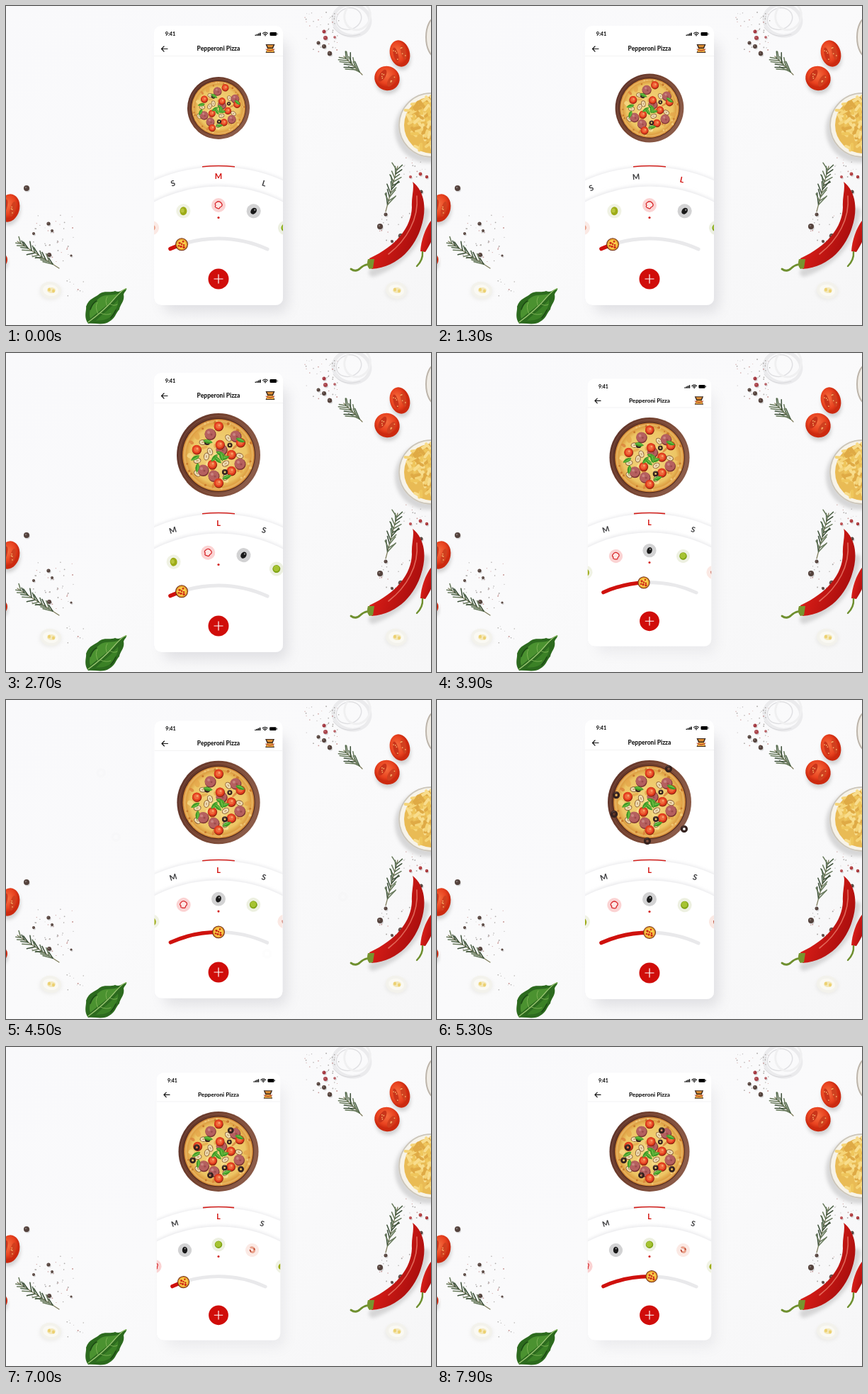
An HTML page that plays this animation: 600 by 450 pixels, repeating every 8000 ms.

```html
<!DOCTYPE html>
<html lang="en">
<head>
<meta charset="utf-8">
<title>Pizza builder</title>
<style>
  html, body { margin: 0; width: 100%; height: 100%; overflow: hidden; background: #f8f8fa; }
  svg { display: block; width: 100vw; height: 100vh; }
  text { font-family: Lato, "Open Sans", sans-serif; text-anchor: middle; fill: #161616; }
</style>
</head>
<body>
<svg viewBox="0 0 600 450" xmlns="http://www.w3.org/2000/svg">
  <defs>
    <filter id="soft" x="-30%" y="-30%" width="160%" height="160%"><feGaussianBlur stdDeviation="9"/></filter>
    <filter id="haze" x="-20%" y="-20%" width="140%" height="140%"><feGaussianBlur stdDeviation="2.5"/></filter>
    <linearGradient id="table" x2="1" y2="1">
      <stop stop-color="#f9f9fb"/><stop offset=".5" stop-color="#fafafb"/><stop offset="1" stop-color="#f6f6f7"/>
    </linearGradient>
    <linearGradient id="wood" x2="1" y2=".4"><stop stop-color="#5a3029"/><stop offset=".5" stop-color="#74422f"/><stop offset="1" stop-color="#8a5a47"/></linearGradient>
    <radialGradient id="cheese"><stop stop-color="#f3d884"/><stop offset=".85" stop-color="#edc564"/><stop offset="1" stop-color="#dc9c40"/></radialGradient>
    <radialGradient id="tomato" cx=".4" cy=".4"><stop stop-color="#f56f40"/><stop offset=".7" stop-color="#e8421f"/><stop offset="1" stop-color="#cc2a10"/></radialGradient>
    <linearGradient id="chili" x2="1" y2=".6"><stop stop-color="#e2382a"/><stop offset=".5" stop-color="#cf1a15"/><stop offset="1" stop-color="#a50d0d"/></linearGradient>
    <clipPath id="screen"><rect x="209" y="28" width="182" height="394" rx="10"/></clipPath>
  </defs>
  <rect width="600" height="450" fill="url(#table)"/>
  <g id="scene"></g>
  <g id="phone">
    <rect id="shade" x="222" y="50" width="176" height="382" rx="12" fill="#8a8a96" filter="url(#soft)"/>
    <rect x="209" y="28" width="182" height="394" rx="10" fill="#fff"/>
    <g clip-path="url(#screen)">
      <g id="bar"></g>
      <circle cx="300" cy="453" r="227" fill="#e6e6e9" filter="url(#haze)"/>
      <circle cx="300" cy="453" r="226" fill="#fff"/>
      <circle cx="300" cy="453" r="200" fill="#e6e6e9" filter="url(#haze)"/>
      <circle cx="300" cy="453" r="198.500" fill="#fff"/>
      <path d="M277 226.700A227 227 0 0 1 323 226.700" fill="none" stroke="#d3201c" stroke-width="1.600"/>
      <g id="sizes"></g>
      <g id="fills"></g>
      <circle cx="300" cy="298.500" r="1.600" fill="#d3201c"/>
      <path id="rail" fill="none" stroke="#e9e9eb" stroke-width="5" stroke-linecap="round"/>
      <path id="level" fill="none" stroke="#cf110d" stroke-width="5.500" stroke-linecap="round"/>
      <g id="knob"></g>
      <circle cx="300" cy="385" r="14.500" fill="#d00d0a"/>
      <path d="M293.500 385H306.500M300 378.500V391.500" stroke="#fff" stroke-width="1.200"/>
    </g>
    <g id="pizza"></g>
    <g id="rings"></g>
  </g>
</svg>
<script>
const $ = id => document.getElementById(id);
const rad = d => d * Math.PI / 180;
const LOOP = 8000;

let seed = 7;
const rnd = () => (seed = seed * 16807 % 2147483647) / 2147483647;
const span = (a, b) => a + (b - a) * rnd();
const pick = list => list[Math.floor(rnd() * list.length)];

const disc = (x, y, r, fill, more = '') => `<circle cx="${x}" cy="${y}" r="${r}" fill="${fill}" ${more}/>`;
const oval = (x, y, rx, ry, turn, fill, more = '') =>
  `<ellipse rx="${rx}" ry="${ry}" transform="translate(${x} ${y}) rotate(${turn})" fill="${fill}" ${more}/>`;
const line = (d, color, w, more = '') =>
  `<path d="${d}" fill="none" stroke="${color}" stroke-width="${w}" stroke-linecap="round" stroke-linejoin="round" ${more}/>`;
const shape = (d, fill, more = '') => `<path d="${d}" fill="${fill}" ${more}/>`;
const repeat = (n, fn) => Array.from({ length: n }, (_, i) => fn(i)).join('');
const blur = 'opacity=".3" filter="url(#haze)"';

// Table ingredients
// A sprig grows from base to tip; its leaves lean towards the tip.
function sprig(x1, y1, x2, y2, n, leaf) {
  const a = Math.atan2(y2 - y1, x2 - x1);
  return line(`M${x1} ${y1}L${x2} ${y2}`, '#7c7a58', 1.2) + repeat(n, i => {
    const k = .15 + .85 * i / n, x = x1 + (x2 - x1) * k, y = y1 + (y2 - y1) * k;
    return [-1, 1].map(side => {
      const b = a + side * span(.3, .85), len = leaf * span(.7, 1.15) * (1.1 - .4 * k);
      return line(`M${x} ${y}l${Math.cos(b) * len} ${Math.sin(b) * len}`, pick(['#3c4f38', '#4e6448', '#66785a']), 1.5);
    }).join('');
  });
}

function halfTomato(x, y, rx, ry, turn) {
  return oval(x + 1, y + 5, rx, ry, turn, '#777', blur) +
    oval(x, y, rx, ry, turn, 'url(#tomato)') +
    `<g transform="translate(${x} ${y}) rotate(${turn})">` +
    oval(-rx * .42, 0, rx * .24, ry * .55, 0, '#c9341a') + oval(rx * .38, 0, rx * .24, ry * .55, 0, '#d0401f') +
    repeat(8, i => disc((i % 2 ? .38 : -.42) * rx + span(-2, 2), span(-.4, .4) * ry, .9, '#f7ad68')) + '</g>';
}

const specks = (x, y, w, h, n) => repeat(n, () =>
  disc(x + span(0, w), y + span(0, h), span(.4, 1), rnd() < .3 ? '#b06a66' : '#8d8986', 'opacity=".7"'));
const corns = list => list.map(([x, y, r, c]) =>
  disc(x + 1, y + 1.5, r, '#888', 'opacity=".3"') + disc(x, y, r, c || '#54423c') +
  disc(x - r / 4, y - r / 4, r / 3, '#fff', 'opacity=".25"')).join('');

const egg = (x, y) => oval(x, y + 2, 16, 12, 0, '#d2d0c8', blur) + oval(x, y, 15, 12, 10, '#f3f2ec') +
  oval(x, y, 11, 8, 10, '#faf9f3') + oval(x + 1, y, 6, 4, 0, '#f4e8b8') +
  oval(x - 2, y - 1, 2, 2.5, 0, '#ecd070') + oval(x + 4, y + 1, 2, 2.5, 0, '#ecd070');

function scene() {
  const bowl = disc(596, 174, 47, '#888', blur) + disc(600, 168, 46, '#e4e1da') +
    disc(600, 168, 44, '#f7f3e8') + disc(602, 168, 40, '#e9bb55') +
    repeat(75, () => {
      const a = span(1.4, 4.9), d = 38 * Math.sqrt(rnd()), turn = span(0, 6.3);
      return line(`M${602 + d * Math.cos(a)} ${168 + d * Math.sin(a)}l${8 * Math.cos(turn)} ${8 * Math.sin(turn)}`,
        pick(['#f5d478', '#efc65c', '#f8dd8d', '#dfaa45']), 4);
    }) + disc(600, 168, 45, 'none', 'stroke="#cbc5b9" stroke-width="1.500"');
  const onion = oval(488, 20, 26, 22, 10, 'none', 'stroke="#ebebed" stroke-width="5"') +
    oval(484, 18, 18, 15, -20, 'none', 'stroke="#e0e0e3" stroke-width="1.500"') +
    oval(496, 14, 18, 20, 20, 'none', 'stroke="#f0f0f1" stroke-width="3"') +
    line('M462 30Q475 48 500 40', '#d8d8db', 1);
  const basil = shape('M116 448C109 438 114 430 113 424C117 412 127 411 132 406C139 401 146 405 154 402C161 405 164 400 170 398C171 401 167 403 166 407C168 416 161 421 160 428C155 433 154 441 146 445C138 451 126 447 116 448Z', '#2c6a1e') +
    shape('M119 441C115 428 124 418 133 411C140 406 150 409 158 406C152 416 138 425 119 441Z', '#4b9230') +
    shape('M127 444C136 434 148 427 158 414C160 422 154 430 148 438C141 444 134 443 127 444Z', '#3b8126') +
    line('M116 446Q138 430 152 414T170 399', '#9cc773', 1.2) +
    line('M130 434Q125 425 129 418M143 423Q139 416 143 410M133 433Q142 437 148 434M146 420Q153 424 157 421', '#7fb457', .9) +
    line('M119 428Q122 419 128 416M148 440Q153 434 155 429', '#1c4a14', 1.6);
  const peppers = line('M592 290Q582 352 518 376', '#888', 12, blur) +
    shape('M574 248C577 256 572 270 573 284C572 312 552 338 513 356L516 371C556 368 578 338 586 312C594 288 592 262 574 248Z', 'url(#chili)') +
    line('M580 268C583 300 566 330 540 350', '#f28b78', 1.6, 'opacity=".7"') +
    line('M516 364Q506 364 500 370T487 371', '#6e8f2e', 2.8) + shape('M511 357L520 357L518 370L513 371Q508 366 511 357Z', '#77952f') +
    shape('M604 298C594 308 586 328 585 346L592 347C598 338 602 330 606 318Z', 'url(#chili)') +
    line('M588 347Q589 358 580 367', '#6e8f2e', 2.4);
  return onion + specks(422, 8, 48, 62, 45) + specks(36, 292, 60, 72, 42) + specks(524, 292, 55, 40, 22) + specks(560, 210, 36, 36, 16) +
    specks(84, 385, 26, 26, 10) +
    corns([[449, 36, 2.5, '#a2333c'], [451, 45, 3, '#a8434a'], [457, 67, 3.2], [449, 57, 3], [441, 52, 2.5], [464, 44, 1.8, '#b4555a'],
      [29, 257, 4], [60, 307, 2.6], [65, 317, 2], [61, 351, 3], [92, 352, 1.6], [39, 321, 2],
      [528, 311, 4], [536, 294, 2.5], [557, 324, 3], [585, 237, 2.4, '#b03a3c'], [594, 241, 2.2, '#a83336'], [571, 241, 2, '#b9474a'], [586, 262, 2.5], [545, 332, 2]]) +
    halfTomato(4, 285, 15, 20, 15) + halfTomato(-5, 358, 7, 9, 0) +
    halfTomato(556, 67, 14, 19, -15) + halfTomato(538, 102, 18, 17, 30) +
    sprig(75, 370, 16, 332, 10, 14) + sprig(503, 97, 477, 71, 7, 17) + sprig(536, 290, 553, 226, 10, 15) +
    egg(63, 401) + egg(551, 401) + basil + bowl +
    oval(607, 44, 14, 28, 0, '#f0ece5', 'stroke="#bdb5ab" stroke-width="2"') + peppers;
}

// Phone parts
const bar = `<text x="232" y="42" font-size="7.200" font-weight="800">9:41</text>
  <text x="300" y="63" font-size="8.500" font-weight="800">Pepperoni Pizza</text>` +
  repeat(4, i => `<rect x="${351.500 + i * 2.2}" y="${40.5 - i}" width="1.600" height="${1.5 + i}" rx=".4"/>`) +
  line('M362.500 38.600Q366 35.800 369.500 38.600M364 40.200Q366 38.600 368 40.200', '#161616', 1.2) + disc(366, 41.5, .9, '#161616') +
  '<rect x="372.500" y="37" width="9.500" height="5" rx="1.300"/><rect x="382.700" y="38.500" width=".8" height="2"/>' +
  line('M228 60.500H219.500M223 57L219.500 60.500L223 64', '#161616', 1.2) +
  shape('M366.500 54H379.500L377 60L379.500 66H366.500L369 60Z', '#3c2a20') +
  shape('M368.500 55H377.500L376 58.500H370Z', '#d98b32') + shape('M369 60H377L378.500 65H367.500Z', '#e9a741') +
  line('M367 61L373 63L379 61', '#b5311f', 1) +
  '<path d="M209 70.500H391" stroke="#f0f0f2" stroke-width=".8"/>';

const olive = (x, y, r) => disc(x, y, r * .7, 'none', `stroke="#34211e" stroke-width="${r * .65}"`) +
  line(`M${x - r * .6} ${y - r * .5}A${r * .8} ${r * .8} 0 0 1 ${x + r * .2} ${y - r * .8}`, '#866b63', .6);
const leafAt = (x, y, turn) => `<g transform="translate(${x} ${y}) rotate(${turn})">` +
  shape('M-7 0Q-2 -6 7 0Q0 5.500 -7 0Z', '#3f9a26') + shape('M-6 0Q-1 -4 6 0Z', '#6cbf45') + '</g>';

function pizza() {
  const scatter = (n, r0, r1, fn) => repeat(n, () => {
    const a = span(0, 6.28), d = span(r0, r1);
    return fn(d * Math.cos(a), d * Math.sin(a));
  });
  const salami = [[-12, -30], [30, 12], [-22, 21], [24, -27], [-7, 29], [4, -8]];
  const cherry = [[0, -41], [2, -15], [18, -1], [-31, -8], [18, 22], [0, 39], [-9, 13], [31, -18]];
  const mush = [[-22, -18], [14, -24], [-17, 2], [10, 12], [30, 1], [-12, -5], [10, 31], [-30, 8], [-30, 26]];
  const leaves = [[-6, 4, 130], [3, -2, 20], [-1, 7, 40], [9, 4, -20], [31, -21, 20], [-33, 4, 150], [-30, 18, 95], [12, 31, -25], [-15, -19, 10], [4, 2, 75]];
  return disc(0, 0, 59, 'url(#wood)') + disc(0, 0, 55.500, 'none', 'stroke="#9c6a57" stroke-width=".8" opacity=".6"') +
    disc(0, 0, 52, '#4a241a') + disc(0, 0, 51, '#cf8436') + disc(0, 0, 49.500, '#e6b05a') + disc(0, 0, 46.500, 'url(#cheese)') +
    scatter(24, 43, 49, (x, y) => disc(x, y, span(1, 2.2), pick(['#c97a2e', '#f0c877']))) +
    scatter(34, 2, 43, (x, y) => oval(x, y, span(2, 6), span(1.5, 4), span(0, 180), pick(['#f8e29a', '#e5a64b', '#d9803a', '#f6da86']), 'opacity=".8"')) +
    mush.map(([x, y], i) => oval(x, y, 5.500, 4, i * 50, '#8f6238') + oval(x, y, 4.500, 3, i * 50, '#f0deb4') + oval(x, y, 2, 1, i * 50, '#c9a673')).join('') +
    salami.map(([x, y]) => disc(x + .6, y + 1, 8, '#7c3433') + disc(x, y, 7.500, '#b5605f') + disc(x - 2, y - 2, 2, '#c98481') + disc(x + 2, y + 1, 1.500, '#9b4a4b')).join('') +
    cherry.map(([x, y]) => disc(x + .4, y + .8, 6.700, '#8f1f10') + disc(x, y, 6.200, '#e33d1e') + disc(x, y, 3.800, '#ef6a3c') + disc(x + 1, y - 1, 1.500, '#f7a26a')).join('') +
    olive(9, 24, 4) + olive(-16, -18, 4) + olive(16, -14, 3.500) + leaves.map(l => leafAt(...l)).join('');
}

const fillIcons = [
  disc(0, 0, 10, '#f0f2e4') + oval(0, 0, 5, 6, 20, '#9cab16') + oval(-1, -1, 2.500, 3, 20, '#b9c53c'),
  disc(0, 0, 10, '#fbd3d3') + shape('M-3 -4Q1 -7 4 -3Q7 1 2 3Q1 6 -2 4Q-6 3 -4 0Q-6 -2 -3 -4Z', '#fde6e4', 'stroke="#d8262a" stroke-width="1.300"'),
  disc(0, 0, 10, '#d2d2d3') + oval(0, 0, 3.800, 5, 20, '#191919') + oval(1, -2, .9, 1.200, 20, '#aaa'),
  disc(0, 0, 10, '#edf0e1') + disc(0, 0, 5.500, '#7fa314') + disc(-.5, -.5, 4.200, '#a6c332'),
  disc(0, 0, 10, '#fbe9e4') + line('M-3 -3Q1 -5 3 -1Q4 2 1 3', '#e9a18a', 3) + line('M-3 1L-1 3M2 -3L3 -2', '#b8432f', 1.800)
];

const knobArt = disc(0, 0, 9, '#6f2a12') + disc(0, 0, 8, '#e9a030') + disc(0, 0, 6.300, '#f9cf4a') +
  [[-3, -2], [2, -4], [3, 1], [-1, 3], [0, -.5], [-4, 2], [3, 4]].map(([x, y], i) => disc(x, y, i % 3 ? 1.300 : 1.700, '#cf2b17')).join('');

$('scene').innerHTML = scene();
$('bar').innerHTML = bar;
$('pizza').innerHTML = pizza();
$('knob').innerHTML = knobArt;
$('fills').innerHTML = fillIcons.map(s => `<g>${s}</g>`).join('');
$('sizes').innerHTML = ['S', 'M', 'L'].map(s => `<text y="4" font-size="11" font-weight="700">${s}</text>`).join('');

const landing = [[18, -31], [-32, -6], [-38, 13], [33, 26], [-12, 35]];
const start = [[27, -47], [-47, -10], [-50, 17], [49, 38], [-3, 55]];
$('rings').innerHTML = landing.map(() => `<g>${olive(0, 0, 5)}</g>`).join('');

// Motion
const ease = x => x < .5 ? 4 * x ** 3 : 1 - 4 * (1 - x) ** 3;
function track(t, keys) {
  let [t0, v0] = keys[0];
  for (const [t1, v1] of keys) {
    if (t < t1) return t1 === t0 || t < t0 ? v0 : v0 + (v1 - v0) * ease((t - t0) / (t1 - t0));
    [t0, v0] = [t1, v1];
  }
  return v0;
}
const SIZE = [[900, 0], [1860, 1]];
const FILL = [[2400, 0], [3120, 1], [6000, 1], [6720, 2]];
const ZOOM = [[3200, 1], [3700, .958], [4200, .958], [4650, 1], [6000, 1], [6400, .958]];
const KNOB = [[3300, -18.25], [4212, 0], [6030, 0], [6720, -18.25], [6900, -18.25], [7800, 1.08]];

const wrap = (v, n) => ((v + n / 2) % n + n) % n - n / 2;
const onArc = (cy, r, deg) => [300 + r * Math.sin(rad(deg)), cy - r * Math.cos(rad(deg))];
const arc = (a, b) => `M${onArc(494, 166, a)}A166 166 0 0 1 ${onArc(494, 166, b)}`;
const move = (el, [x, y], rest = '') => el.setAttribute('transform', `translate(${x} ${y}) ${rest}`);
$('rail').setAttribute('d', arc(-24.2, 24.6));

function draw(t) {
  const size = track(t, SIZE), fill = track(t, FILL), zoom = track(t, ZOOM), lever = track(t, KNOB);
  move($('phone'), [300, 225], `scale(${zoom}) translate(-300 -225)`);
  $('shade').style.opacity = .22 - (1 - zoom) * 2.4;
  move($('pizza'), [300, 144], `scale(${(44 + 15 * size) / 59}) rotate(${18 * (1 - size)})`);

  const active = t < 950 ? 1 : 2;
  [...$('sizes').children].forEach((el, i) => {
    const a = wrap(i - 1 - size, 3) * 17.6;
    move(el, onArc(453, 213, a), `rotate(${a})`);
    el.style.fill = i === active ? '#d3100c' : '#3a3a3c';
  });
  [...$('fills').children].forEach((el, i) => {
    const a = wrap(i - 1 - fill, 5) * 18.8;
    move(el, onArc(435, 154, a), `rotate(${a})`);
  });

  $('level').setAttribute('d', arc(-24.2, lever));
  move($('knob'), onArc(494, 166, lever));

  const p = Math.min(1, Math.max(0, (t - 4500) / 1200));
  const away = (1 - p) ** 2 * 9;
  [...$('rings').children].forEach((el, i) => {
    const at = j => landing[i][j] + (start[i][j] - landing[i][j]) * away;
    move(el, [300 + at(0), 144 + at(1)], `scale(${.9 + Math.min(.5, away * .1)})`);
    el.style.opacity = Math.min(1, p * 4);
  });
}

function tick() {
  draw(performance.now() % LOOP);
  requestAnimationFrame(tick);
}
tick();
</script>
</body>
</html>
```
